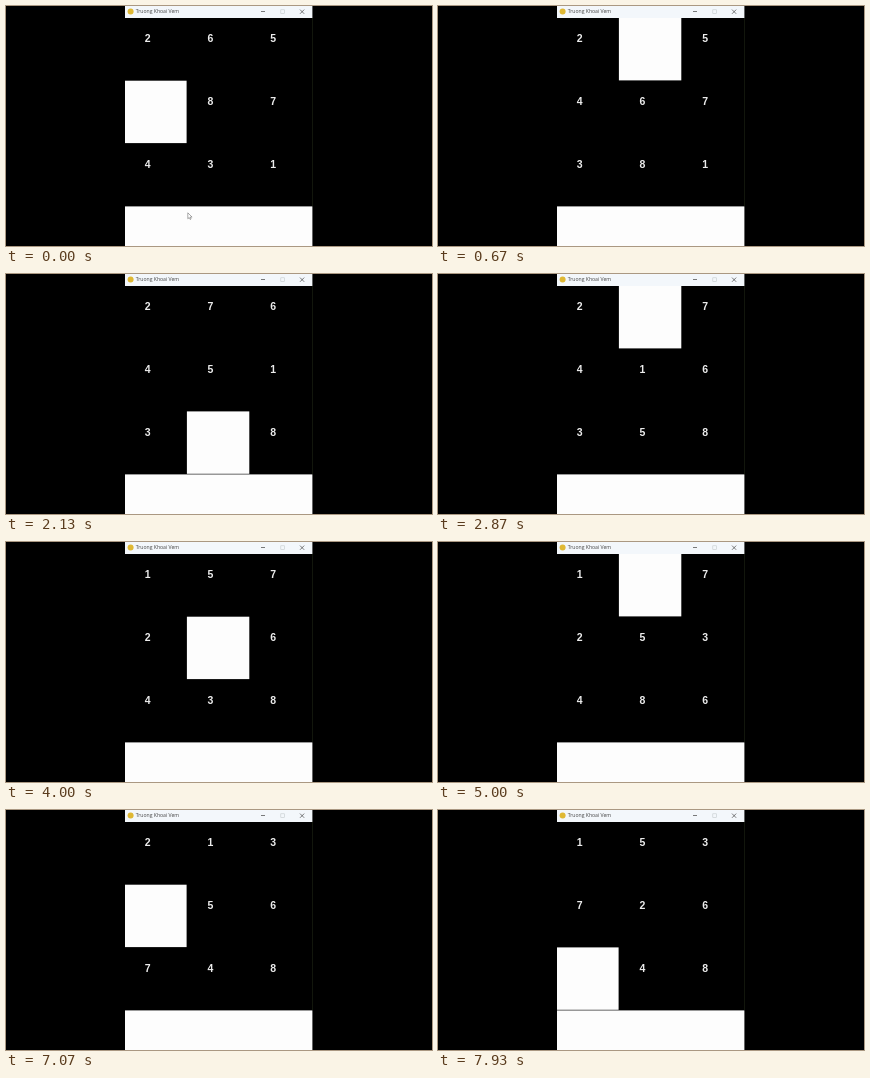
An HTML page that plays this animation: 426x240 px, repeating every 8 s.

```html
<!DOCTYPE html>
<html lang="en">
<head>
<meta charset="utf-8">
<title>Sliding puzzle</title>
<style>
  html, body { margin: 0; width: 100%; height: 100%; overflow: hidden; background: #000; }
  svg { display: block; width: 100%; height: 100%; }
  .title { font: 5.1px "Open Sans", "Noto Sans", sans-serif; fill: #444; }
  .digit { font: bold 10.5px "Liberation Sans", Arial, sans-serif; fill: #ececec; text-anchor: middle; }
</style>
</head>
<body>
<svg viewBox="0 0 426 240">
  <rect width="426" height="240"/>
  <path d="M306.5 12V200" stroke="#12160c"/>

  <rect x="119" width="187.4" height="12" fill="#f3f7fb"/>
  <circle cx="124.6" cy="5.4" r="3" fill="#dfb834"/>
  <text class="title" x="129.7" y="7.3">Truong Khoai Vem</text>
  <g fill="none" stroke="#444" stroke-width=".7">
    <path d="M255 5.5h4M294 3.6l4.2 4.2m0-4.2l-4.2 4.2"/>
    <rect x="274.8" y="3.8" width="3.6" height="3.6" stroke="#c3cacc" stroke-width=".6"/>
  </g>

  <g fill="#fdfdfd">
    <rect id="blank" width="62.4" height="62.4"/>
    <rect x="119" y="200.4" width="187.4" height="39.6"/>
  </g>
  <g id="digits"></g>
  <path id="cursor" d="M181.8 206.8v6l1.4-1.3 1 2 .9-.5-.9-1.9h1.9z" fill="#fff" stroke="#555" stroke-width=".5"/>
</svg>
<script>
  const LOOP = 8000, STEP = 177, FIRST_MOVE = 75, CURSOR_HIDES = 600;
  const CELL = 62.7, LEFT = 118.2, TOP = 12;
  const START = [2, 6, 5, 0, 8, 7, 4, 3, 1];
  // Directions in which the empty cell travels.
  const MOVES = "DRUURDLURDDLURULDDLUURDDRULURDLULDRRDLLUURDLD";
  const OFFSET = { U: -3, D: 3, L: -1, R: 1 };

  const blank = document.getElementById("blank");
  const cursor = document.getElementById("cursor");
  const cellX = i => LEFT + (i % 3) * CELL;
  const cellY = i => TOP + Math.floor(i / 3) * CELL;

  const digits = START.map((_, i) => {
    const text = document.createElementNS("http://www.w3.org/2000/svg", "text");
    text.setAttribute("class", "digit");
    text.setAttribute("x", cellX(i) + 23.5);
    text.setAttribute("y", cellY(i) + 24.1);
    return document.getElementById("digits").appendChild(text);
  });

  function boardAfter(count) {
    const board = [...START];
    let hole = board.indexOf(0);
    for (const move of MOVES.slice(0, count)) {
      const next = hole + OFFSET[move];
      [board[hole], board[next]] = [board[next], 0];
      hole = next;
    }
    return board;
  }

  function draw(now) {
    const time = now % LOOP;
    const board = boardAfter(Math.max(0, Math.floor((time - FIRST_MOVE) / STEP) + 1));
    const hole = board.indexOf(0);
    digits.forEach((text, i) => { text.textContent = board[i] || ""; });
    // The window's left edge cuts off the first column slightly.
    const x = Math.max(119, cellX(hole));
    blank.setAttribute("x", x);
    blank.setAttribute("width", cellX(hole) + 62.4 - x);
    blank.setAttribute("y", cellY(hole));
    cursor.style.display = time < CURSOR_HIDES ? "" : "none";
  }

  const origin = performance.now();
  function tick() {
    draw(performance.now() - origin);
    requestAnimationFrame(tick);
  }
  tick();
</script>
</body>
</html>
```
